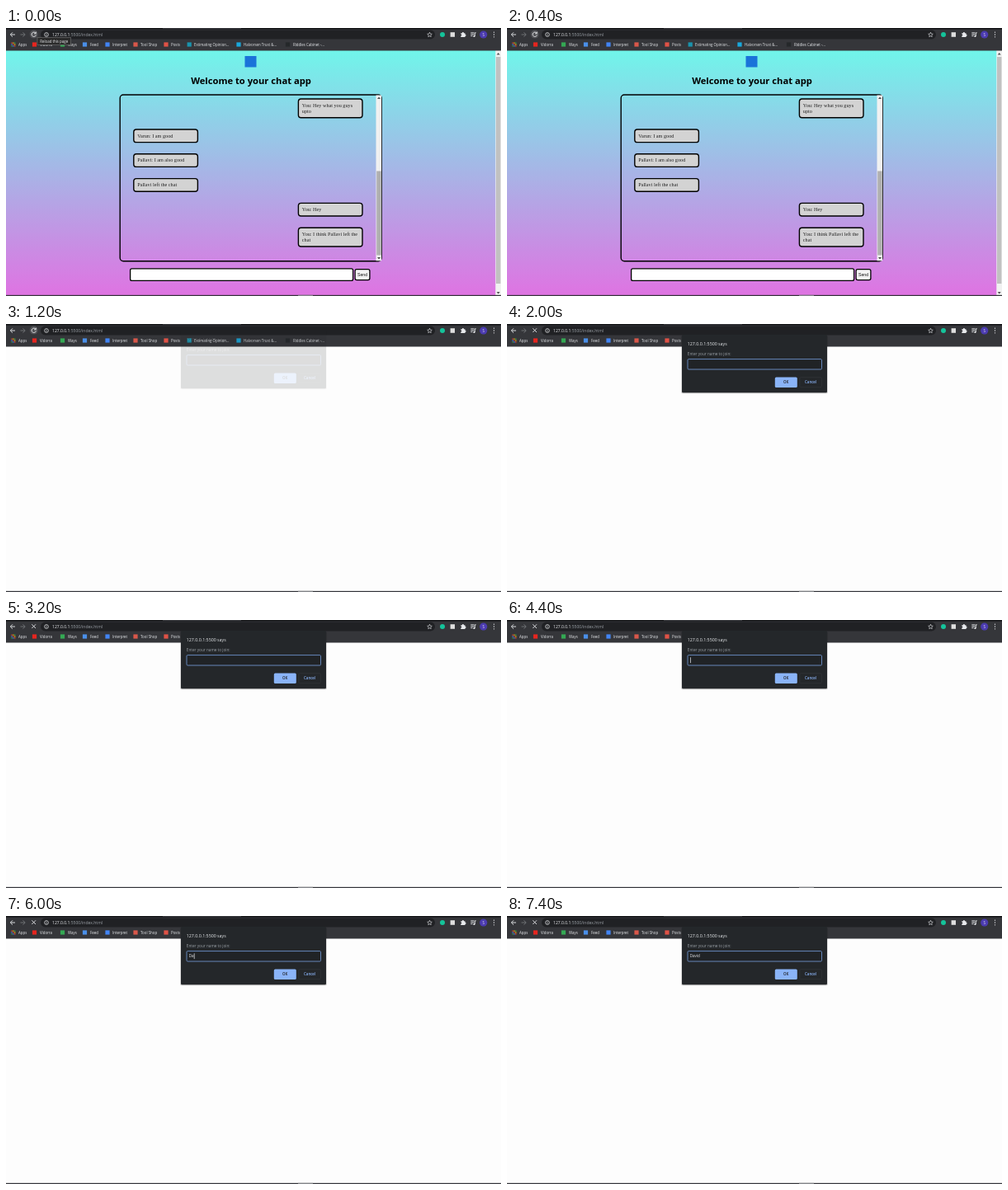
These frames come from a looping animation (600 px wide and 325 px high, 8 s). An HTML page:

```html
<!DOCTYPE html>
<html lang="en">
<head>
<meta charset="utf-8">
<title>Chat app</title>
<style>
html, body { margin: 0; width: 100%; height: 100%; overflow: hidden; background: #fdfdfd; }
svg { display: block; width: 100%; height: 100%; }
text { font-family: "Open Sans", "Noto Sans", sans-serif; font-size: 4.4px; fill: #e8eaed; white-space: pre; }
.serif text { font-family: "Liberation Serif", serif; font-size: 6.2px; fill: #222; }
.line { fill: none; stroke: #e8eaed; stroke-width: .9; }
</style>
</head>
<body>
<svg viewBox="0 0 600 325">
  <defs>
    <linearGradient id="sky" x2="0" y2="1">
      <stop stop-color="#70f5ea"/><stop offset="1" stop-color="#df73e2"/>
    </linearGradient>
  </defs>

  <g id="page">
    <rect y="27" width="600" height="298" fill="url(#sky)"/>
    <rect x="289.5" y="34" width="14" height="13.5" fill="#1a73d9"/>
    <text x="297" y="67.8" text-anchor="middle" style="font-size:11.2px;font-weight:700;fill:#000">Welcome to your chat app</text>
    <rect x="138.2" y="81" width="317" height="201.8" rx="4" fill="none" stroke="#000" stroke-width="1.4"/>
    <g id="chat" class="serif"></g>
    <rect x="448.5" y="81.5" width="6.6" height="200.8" fill="#f1f1f1"/>
    <rect x="449.2" y="173.5" width="5.6" height="102" fill="#b0b0b0"/>
    <path d="M450 86l2-2.4 2 2.4zM450 278l2 2.4 2-2.4z" fill="#505050"/>
    <rect x="150.6" y="291.8" width="270" height="14.6" rx="2" fill="#fff" stroke="#000" stroke-width="1.3"/>
    <rect x="423.1" y="292.6" width="17.8" height="13" rx="2" fill="#f4f4f4" stroke="#000" stroke-width="1.3"/>
    <text x="432" y="301" text-anchor="middle" style="font:5.2px 'Liberation Sans',sans-serif;fill:#111">Send</text>
    <rect x="593.3" y="27" width="6.7" height="298" fill="#f1f1f1"/>
    <rect x="594" y="35" width="5.4" height="275" fill="#c1c1c1"/>
    <path d="M594.7 32.5l2-2.4 2 2.4zM594.7 320l2 2.4 2-2.4z" fill="#505050"/>
  </g>

  <rect width="600" height="27.5" fill="#35363a"/>
  <rect width="600" height="1.6" fill="#161719"/>
  <rect x="190" width="95" height="1" fill="#3a3b3f"/>
  <rect x="42" y="2.6" width="478" height="10.8" rx="5.4" fill="#202124"/>
  <path class="line" d="M11 8H5.5M8 5.3L5.3 8 8 10.7"/>
  <path class="line" d="M17.5 8H23M20.5 5.3L23.2 8 20.5 10.7" style="stroke:#74767a"/>
  <g id="reload">
    <circle cx="33.7" cy="7.6" r="5" fill="#505155"/>
    <path class="line" d="M36 6.2A2.7 2.7 0 1 0 36.4 8.5M36.3 4.6V6.8H34.1"/>
  </g>
  <circle id="click" cx="34" cy="7.5" r="4.1" fill="none" stroke="#d65345" stroke-width="1.2"/>
  <path id="stop" class="line" d="M31.3 5.3L36 10M36 5.3L31.3 10"/>
  <circle class="line" cx="49" cy="8" r="2.4" style="stroke-width:.7"/>
  <path class="line" d="M49 7.6V9.4M49 6.4V7" style="stroke-width:.7"/>
  <text x="56" y="9.9" style="font-size:5.05px">127.0.0.1<tspan fill="#9aa0a6" style="fill:#9aa0a6">:5500/index.html</tspan></text>

  <path class="line" d="M513.5 5.2l.8 1.9 2 .2-1.5 1.4.4 2-1.7-1-1.7 1 .4-2-1.5-1.4 2-.2z" style="stroke-width:.6"/>
  <circle cx="529" cy="8" r="3" fill="#15c39a"/>
  <rect x="538.6" y="5.2" width="5.4" height="5.6" fill="#dedede"/>
  <path d="M551.3 6.2h1.5a1.1 1.1 0 0 1 2.2 0h1.5v1.5a1.1 1.1 0 0 1 0 2.2v1.2h-5.2v-1.5a1 1 0 0 0 0-2z" fill="#e8eaed"/>
  <path class="line" d="M563.3 5.8H567.5M563.3 7.7H567.5M563.3 9.6H565.5M568.3 10V5.8H569.8"/>
  <circle cx="567.4" cy="10" r="1.1" fill="#e8eaed"/>
  <circle cx="578.7" cy="8" r="4.6" fill="#4b3bb0"/>
  <text x="578.7" y="9.7" text-anchor="middle">S</text>
  <path d="M591.5 5.2v.01M591.5 8v.01M591.5 10.8v.01" stroke="#e8eaed" stroke-width="1.3" stroke-linecap="round"/>
  <g id="marks"></g>

  <g id="tip">
    <rect x="38" y="11.4" width="40.5" height="9" fill="#2b2b2b" stroke="#737373" stroke-width=".6"/>
    <text x="41.3" y="17.6">Reload this page</text>
  </g>

  <g id="dialog">
    <rect x="211.4" y="14" width="177.2" height="70.2" rx="1.5" fill="#000" opacity=".22"/>
    <rect x="212" y="13" width="176" height="70.2" rx="1.5" fill="#24272a"/>
    <text x="218.8" y="26.4" style="font-size:5.3px">127.0.0.1:5500 says</text>
    <text x="218.8" y="38" style="font-size:4.7px;fill:#9aa0a6">Enter your name to join:</text>
    <rect x="219" y="42.6" width="162.5" height="12.4" rx="1.2" fill="#202326" stroke="#6f92ca" stroke-width=".9"/>
    <text id="name" x="221.8" y="50.4" style="font-size:4.5px"></text>
    <rect id="caret" y="45.3" width=".7" height="6.8" fill="#e8eaed"/>
    <rect x="324.8" y="64.4" width="27" height="12.6" rx="1.5" fill="#8ab4f8"/>
    <text x="338.2" y="72.3" text-anchor="middle" style="fill:#202124;font-weight:600">OK</text>
    <rect x="354.9" y="64.7" width="26.5" height="12" rx="1.5" fill="none" stroke="#34383c" stroke-width=".6"/>
    <text x="368.1" y="72.3" text-anchor="middle" style="fill:#8ab4f8;font-weight:600">Cancel</text>
  </g>

  <rect y="323.8" width="600" height="1.2" fill="#34353a"/>
  <rect x="354" y="323.8" width="18" height="1.2" fill="#85878b"/>
</svg>

<script>
const $ = id => document.getElementById(id);
const show = (id, on) => $(id).setAttribute("visibility", on ? "visible" : "hidden");

// x, y, lines of each bubble
$("chat").innerHTML = [
  [354.4, 86, "You: Hey what you guys", "upto"],
  [154.8, 123, "Varun: I am good"],
  [154.8, 152.8, "Pallavi: I am also good"],
  [154.8, 182.6, "Pallavi left the chat"],
  [354.4, 212.4, "You: Hey"],
  [354.4, 242.2, "You: I think Pallavi left the", "chat"]
].map(([x, y, ...lines]) =>
  `<rect x="${x}" y="${y}" width="77.6" height="${8.4 + 7.2 * lines.length}" rx="3.2" fill="#d3d3d3" stroke="#000" stroke-width="1.4"/>` +
  lines.map((s, i) => `<text x="${x + 4.4}" y="${y + 9.6 + 7.2 * i}">${s}</text>`).join("")
).join("");

// icon x, text x, colour, label
const marks = [
  [34.5, 41, "#e5251f", "Vidorra"],
  [68.5, 75, "#34a853", "Ways"],
  [95.5, 102, "#4a8fe8", "Feed"],
  [123, 129, "#4285f4", "Interpret"],
  [157, 163, "#d9574a", "Tool Shop"],
  [194, 200, "#e05246", "Posts"],
  [222.2, 228, "#1a93ad", "Estimating Opinion..."],
  [282, 288, "#19a8dc", "Halvorsen Trust &amp;..."],
  [341.5, 348, "#25282a", "Riddles Cabinet -..."]
];
const dots = ["#ea4335", "#fbbc05", "#34a853", "#4285f4"];
$("marks").innerHTML =
  Array.from({ length: 9 }, (_, i) =>
    `<rect x="${6.3 + i % 3 * 1.9}" y="${17.5 + Math.floor(i / 3) * 1.9}" width="1.3" height="1.3" fill="${dots[i % 4]}"/>`).join("") +
  `<text x="15" y="21.7">Apps</text>` +
  marks.map(([x, tx, c, s]) =>
    `<rect x="${x - 2.6}" y="17.4" width="5.2" height="5.2" fill="${c}"/><text x="${tx}" y="21.7">${s}</text>`).join("");

// time of each keystroke
const keys = [5200, 6000, 6600, 7000, 7000];

function draw(now) {
  const t = Math.floor(now % 8000 / 200) * 200;
  const loading = t >= 1400;
  show("page", t < 1200);
  show("tip", t < 200);
  show("reload", !loading);
  show("click", t === 1000);
  show("stop", loading);
  $("dialog").setAttribute("opacity", t < 1200 ? 0 : loading ? 1 : .14);
  $("dialog").setAttribute("transform", `matrix(1 0 0 1 0 ${loading ? 0 : -5})`);

  const name = $("name");
  const typed = keys.filter(k => k <= t);
  name.textContent = "David".slice(0, typed.length);
  const last = Math.max(2800, ...typed);
  const lit = t === 2200 || t >= 2800 && Math.floor((t - last) / 400) % 2 === 0;
  $("caret").setAttribute("x", 222 + name.getComputedTextLength());
  show("caret", lit);
  requestAnimationFrame(draw);
}
requestAnimationFrame(draw);
</script>
</body>
</html>
```
